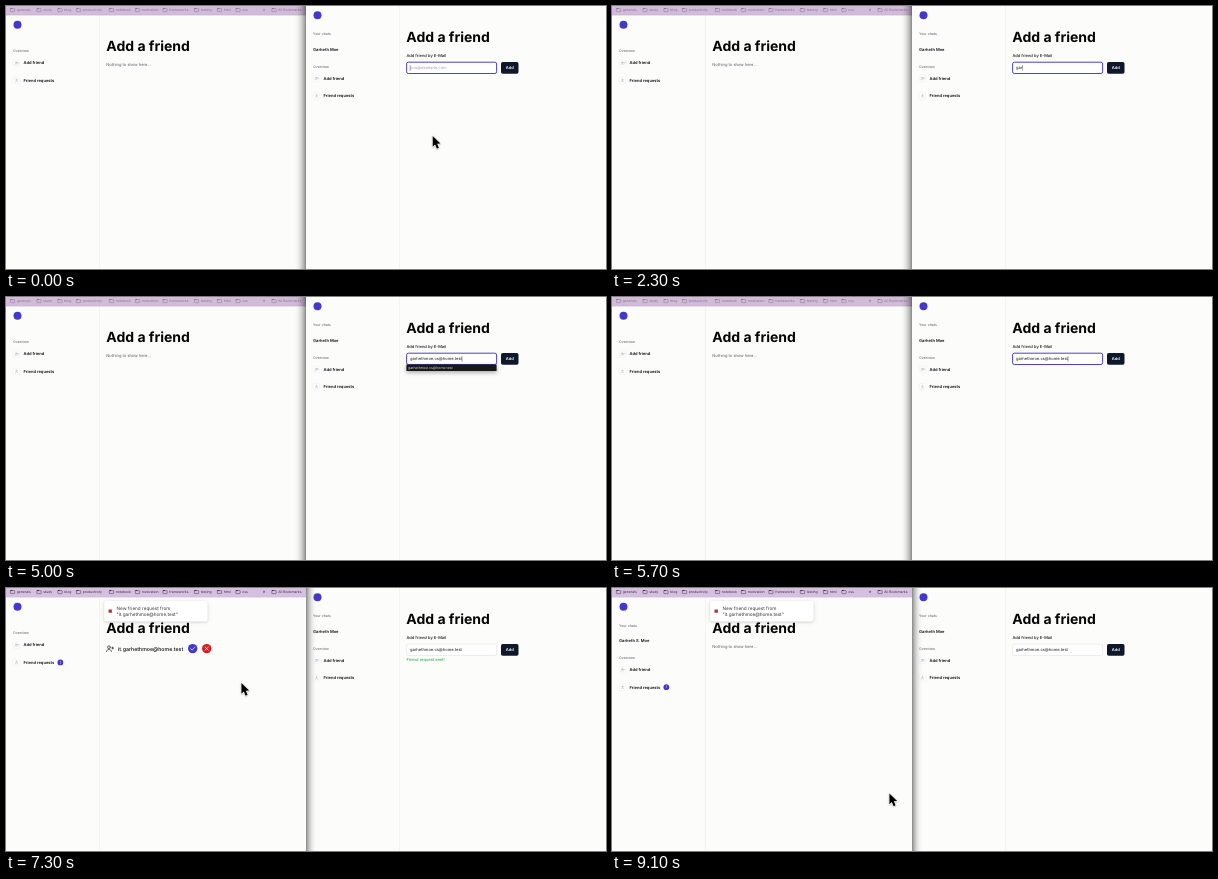
An HTML page with a canvas that plays this animation: 600 by 263 pixels, repeating every 9200 ms.

```html
<!DOCTYPE html>
<html lang="en">
<head>
<meta charset="utf-8">
<title>Friend request demo</title>
<style>
html, body { margin: 0; width: 100%; height: 100%; overflow: hidden; background: #fcfcfb; }
canvas { display: block; width: 600px; height: 263px; }
</style>
</head>
<body>
<canvas id="stage"></canvas>
<script>
const W = 600, H = 263, LOOP = 9200, TICK = 100;
const FONT = 'Inter, "Open Sans", sans-serif';
const INDIGO = '#4338ca', INK = '#0b0b10', GRAY = '#71717a', PAGE = '#fcfcfb';
const TITLE = 14, LARGE = 5.24, BASE = 4.66, SMALL = 4.07, TINY = 3.5;

const RECEIVER = 'garhethmoe.cs@home.test';
const SENDER = 'it.garhethmoe@home.test';

// Time at which each successive letter of the address shows up.
const KEYS = [800, 2000, 2200, 2500, 2800, 2800, 3000, 3100, 3200, 3400, 3500, 3600,
  3800, 3900, 4000, 4100, 4200, 4300, 4400, 4500, 4600, 4700, 4700];
const SENT = 5800, TOAST = 6000, REQUEST = 6100, ACTIVATE = 7200;
const ACCEPT = 8200, CHAT = 8500, SENT_END = 8700;

// Pointer stops: time, x, y.
const PATH_IN = [[0, 426.3, 130], [200, 430, 112], [400, 442, 76], [600, 450, 62]];
const PATH_OUT = [[5900, 420, 66], [6200, 360, 92], [6500, 321.5, 110], [6700, 321.5, 110],
  [7000, 268, 104], [7200, 240, 98], [7400, 230, 92], [7700, 203, 73], [7900, 193, 66],
  [8000, 188, 62], [8300, 188, 62], [8500, 212, 112], [8700, 245, 159], [9000, 277, 205.5]];

const FOLDERS = [[4, 'generals'], [30.5, 'study'], [51.5, 'blog'], [70, 'productivity'],
  [103, 'notebook'], [129, 'motivation'], [156.5, 'frameworks'], [188, 'testing'],
  [211, 'html'], [229.5, 'css'], [265.5, 'All Bookmarks']];

const canvas = document.getElementById('stage');
const ctx = canvas.getContext('2d');
const scale = window.devicePixelRatio || 1;
canvas.width = Math.round(W * scale);
canvas.height = Math.round(H * scale);

function text(str, x, y, size, color = INK, weight = 400, align = 'left') {
  ctx.font = `${weight} ${size}px ${FONT}`;
  ctx.fillStyle = color;
  ctx.textAlign = align;
  // y is the middle of the capital letters
  ctx.fillText(str, x, y + size * 0.364);
  return ctx.measureText(str).width;
}

function box(x, y, w, h, r, fill, stroke, line = 0.4) {
  ctx.beginPath();
  ctx.roundRect(x, y, w, h, r);
  if (fill) { ctx.fillStyle = fill; ctx.fill(); }
  if (stroke) { ctx.strokeStyle = stroke; ctx.lineWidth = line; ctx.stroke(); }
}

function disc(x, y, r, fill) {
  ctx.beginPath();
  ctx.arc(x, y, r, 0, Math.PI * 2);
  ctx.fillStyle = fill;
  ctx.fill();
}

function lines(color, width, ...paths) {
  ctx.strokeStyle = color;
  ctx.lineWidth = width;
  ctx.lineCap = ctx.lineJoin = 'round';
  ctx.beginPath();
  for (const p of paths) p.forEach(([x, y], i) => i ? ctx.lineTo(x, y) : ctx.moveTo(x, y));
  ctx.stroke();
}

function shadow(color, blur, dy) {
  ctx.shadowColor = color;
  ctx.shadowBlur = blur * scale;
  ctx.shadowOffsetY = dy * scale;
}

function userIcon(x, y, s, color, plus) {
  ctx.save();
  ctx.translate(x - (plus ? s * 0.12 : 0), y);
  ctx.scale(s, s);
  ctx.strokeStyle = color;
  ctx.lineWidth = 0.09;
  ctx.lineCap = 'round';
  ctx.beginPath();
  ctx.arc(0, -0.2, 0.2, 0, Math.PI * 2);
  ctx.moveTo(-0.36, 0.42);
  ctx.bezierCurveTo(-0.36, 0.02, 0.36, 0.02, 0.36, 0.42);
  ctx.stroke();
  if (plus) lines(color, 0.09, [[0.4, -0.08], [0.66, -0.08]], [[0.53, -0.21], [0.53, 0.05]]);
  ctx.restore();
}

function menuItem(label, y, plus) {
  box(7.2, y - 3.3, 6.6, 6.6, 1.6, '#fff', '#e2e2e6', 0.35);
  userIcon(10.5, y, 3.6, '#8b8b94', plus);
  return 17.5 + text(label, 17.5, y, SMALL, INK, 600);
}

function sidebar(friend, badge) {
  const shift = friend ? 0 : -24.8;
  disc(11.5, 9.3, 4, INDIGO);
  if (friend) {
    text('Your chats', 7, 28, TINY, GRAY, 500);
    text(friend, 7, 43.3, SMALL, INK, 600);
  }
  text('Overview', 7, 60.6 + shift, TINY, GRAY, 500);
  menuItem('Add friend', 72.4 + shift, true);
  const y = 89.8 + shift, end = menuItem('Friend requests', y, false);
  if (badge) {
    disc(end + 6.2, y, 2.9, INDIGO);
    text('1', end + 6.2, y, TINY, '#fff', 400, 'center');
  }
  ctx.fillStyle = '#ebebea';
  ctx.fillRect(93, 0, 0.5, H);
}

function bookmarks(active) {
  ctx.fillStyle = active ? '#d6c0e1' : '#d1bbd9';
  ctx.fillRect(0, 0, 300, 9.3);
  ctx.fillStyle = 'rgba(90,60,110,.16)';
  ctx.fillRect(0, 8.9, 300, 0.4);
  const color = active ? '#3a3040' : '#85758d';
  for (const [x, name] of FOLDERS) {
    box(x + 0.3, 2.1, 2, 1, 0.3, color);
    box(x + 0.3, 2.6, 4.4, 3, 0.5, null, color, 0.5);
    text(name, x + 6.7, 3.9, 3.45, color);
  }
  text('»', 256.7, 3.5, 4, color, 600);
}

function requestRow() {
  userIcon(103.8, 51.2, 7, INK, true);
  text(SENDER, 112, 51.2, LARGE, INK, 500);
  disc(186.7, 51.2, 4.7, INDIGO);
  lines('#fff', 0.7, [[184.7, 51.3], [186.1, 52.7], [188.9, 49.8]]);
  disc(200.7, 51.2, 4.7, '#dc1c24');
  lines('#fff', 0.7, [[199.1, 49.6], [202.3, 52.8]], [[202.3, 49.6], [199.1, 52.8]]);
}

function toast(t) {
  const p = Math.min((t - TOAST) / 350, 1), ease = 1 - (1 - p) ** 3;
  ctx.save();
  ctx.globalAlpha = 0.5 + 0.5 * ease;
  ctx.translate(0, -24 * (1 - ease));
  ctx.save();
  shadow('rgba(0,0,0,.2)', 3.2, 0.9);
  box(98.2, 3.6, 103.4, 20.4, 2.3, '#fff');
  ctx.restore();
  box(102.5, 12, 3.4, 3.4, 0.4, '#b8323c');
  text('New friend request from', 110.5, 10.9, BASE, '#363636');
  text(`"${SENDER}"`, 110.5, 17.2, BASE, '#363636');
  ctx.restore();
}

function leftWindow(t) {
  ctx.save();
  ctx.beginPath();
  ctx.rect(0, 0, 300, H);
  ctx.clip();
  ctx.save();
  ctx.translate(0, 9.4);
  sidebar(t >= CHAT ? 'Garheth S. Moe' : '', t >= REQUEST);
  text('Add a friend', 100.3, 30.6, TITLE, '#050505', 700);
  if (t >= REQUEST && t < ACCEPT) requestRow();
  else text('Nothing to show here...', 100.3, 49.4, SMALL, '#5b5b63');
  if (t >= TOAST) toast(t);
  ctx.restore();
  bookmarks(t >= ACTIVATE);
  ctx.restore();
}

function field(t) {
  const typed = RECEIVER.slice(0, KEYS.filter(k => k <= t).length);
  const focus = t < ACTIVATE;
  box(100.6, 56.2, 90, 11.3, 1.7, '#fff', focus ? INDIGO : '#d4d4d8', focus ? 0.95 : 0.4);
  const w = typed ? text(typed, 104, 62, SMALL, '#18181b') : 0;
  if (!typed) text('you@example.com', 104, 62, SMALL, '#a1a1aa');
  if (focus) lines('#222', 0.4, [[104.2 + w, 59.6], [104.2 + w, 64.4]]);

  if ((t >= 800 && t < 2000) || (t >= 4800 && t < 5500)) {
    ctx.save();
    shadow('rgba(0,0,0,.35)', 4, 1.5);
    box(100.4, 67.6, 90.2, 6.4, 0.5, '#18181a');
    ctx.restore();
    text(RECEIVER, 102, 70.9, TINY, '#d8d8da');
  }
}

function rightWindow(t) {
  ctx.save();
  ctx.translate(300, 0);
  sidebar('Garheth Moe', false);
  text('Add a friend', 100.3, 30.6, TITLE, '#050505', 700);
  text('Add friend by E-Mail', 100.4, 50, SMALL, '#18181b', 500);
  box(195, 56, 17.5, 11.7, 1.7, '#0f172a');
  text('Add', 203.75, 62, SMALL, '#fff', 600, 'center');
  if (t >= SENT && t < SENT_END) text('Friend request sent!', 100.4, 72, SMALL, '#16a34a');
  field(t);
  ctx.restore();
}

// Shadow that the front window casts on the other one.
function edge(active) {
  const far = active ? 310 : 289;
  const g = ctx.createLinearGradient(300, 0, far, 0);
  [0.46, 0.26, 0.12, 0.04, 0].forEach((a, i) => g.addColorStop(i / 4, `rgba(0,0,0,${a})`));
  ctx.fillStyle = g;
  ctx.fillRect(Math.min(300, far), 0, Math.abs(far - 300), H);
}

function along(path, t) {
  const i = path.findIndex(p => p[0] > t);
  if (i < 0) return path[path.length - 1].slice(1);
  const a = path[i - 1], b = path[i], p = (t - a[0]) / (b[0] - a[0]);
  return [a[1] + (b[1] - a[1]) * p, a[2] + (b[2] - a[2]) * p];
}

function pointer(t) {
  if (t >= 600 && t < 5900) return;
  const [x, y] = along(t < 600 ? PATH_IN : PATH_OUT, t);
  ctx.save();
  ctx.translate(x, y);
  ctx.beginPath();
  [[0.4, 0], [0.4, 10.8], [2.8, 8.6], [4.6, 12.7], [6.6, 11.8], [4.8, 7.8], [8.2, 7.6]]
    .forEach(([px, py]) => ctx.lineTo(px, py));
  ctx.closePath();
  shadow('rgba(0,0,0,.3)', 1.5, 0.5);
  ctx.lineJoin = 'round';
  ctx.lineWidth = 1.2;
  ctx.strokeStyle = '#fff';
  ctx.stroke();
  ctx.shadowColor = 'transparent';
  ctx.fillStyle = '#000';
  ctx.fill();
  ctx.restore();
}

function draw(now) {
  const t = Math.floor((now % LOOP) / TICK) * TICK;
  ctx.setTransform(scale, 0, 0, scale, 0, 0);
  ctx.textRendering = 'geometricPrecision';
  ctx.fillStyle = PAGE;
  ctx.fillRect(0, 0, W, H);
  leftWindow(t);
  rightWindow(t);
  edge(t >= ACTIVATE);
  pointer(t);
}

let start;
function loop(now) {
  start ??= now;
  draw(Math.max(0, now - start));
  requestAnimationFrame(loop);
}
draw(0);
requestAnimationFrame(loop);
</script>
</body>
</html>
```
